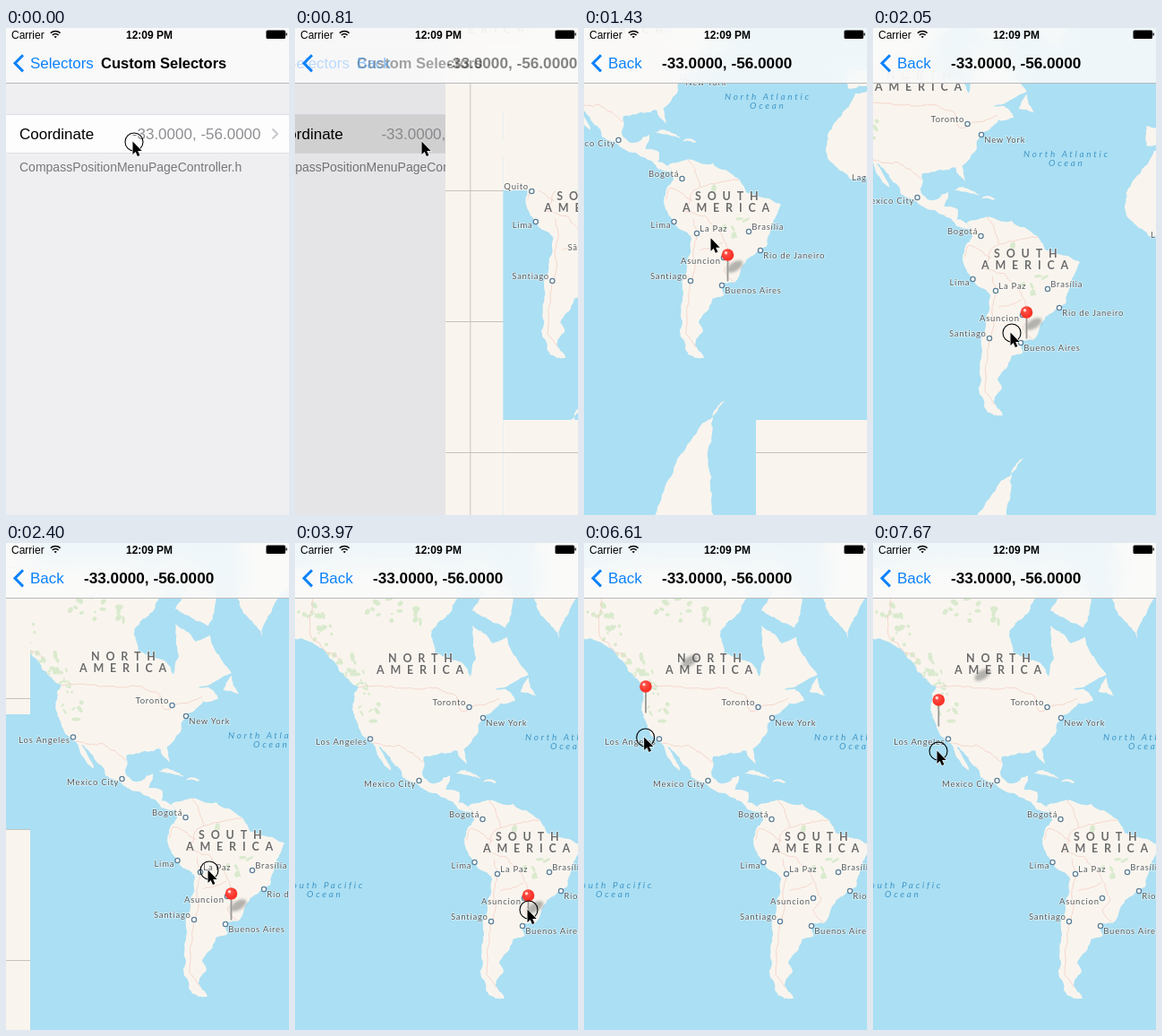
Write an HTML page that moves like this. It is 316 px wide and 543 px high and loops after 8 s.

```html
<!DOCTYPE html>
<html lang="en">
<head>
<meta charset="utf-8">
<title>Coordinate picker</title>
<style>
  html, body { margin: 0; width: 316px; height: 543px; overflow: hidden; background: #efeff2; }
  svg, #bar { position: absolute; left: 0; top: 0; display: block; }
  #bar { width: 316px; height: 61px; background: rgba(251,251,251,.85); backdrop-filter: blur(14px); border-bottom: 1px solid #b9b9bb; }
  text { font: 17px "Liberation Sans", Arial, sans-serif; white-space: pre; }
  text.title { font-weight: bold; }
  text.status { font-size: 12px; }
  #labels text { font: 9.5px Lato, sans-serif; letter-spacing: .75px; fill: #55585a; paint-order: stroke; stroke: #fff9; stroke-width: 1.5px; }
  #labels text.land { font: bold 12.5px Lato, sans-serif; letter-spacing: 6.8px; fill: #6d6b69; }
  #labels text.sea { font: italic 10px Lato, sans-serif; letter-spacing: 2.7px; fill: #3f97c8; stroke: none; }
  #labels circle { fill: #fff; stroke: #5c7f98; stroke-width: 1.3; }
</style>
</head>
<body>
<svg width="316" height="543">
  <defs>
    <pattern id="grid" x="127" y="321" width="146" height="146" patternUnits="userSpaceOnUse">
      <path fill="#f9f5ee" d="M0 0H146V146H0z"/>
      <path stroke="#c6c3bd" fill="none" d="M0 .5H146M.5 0V146"/>
    </pattern>
    <filter id="soft" x="-50%" y="-50%" width="200%" height="200%"><feGaussianBlur stdDeviation="1.8"/></filter>
    <radialGradient id="red" cx=".4" cy=".35"><stop offset="0" stop-color="#ff5a4e"/><stop offset="1" stop-color="#fb3228"/></radialGradient>
    <clipPath id="frame"><path d="M0 0H316V543H0z"/></clipPath>
    <clipPath id="ashore"><use href="#land"/></clipPath>
  </defs>
  <g id="list">
    <path fill="#efeff2" d="M0 0H316V543H0z"/>
    <path id="row" d="M0 96H316V140H0z"/>
    <path stroke="#dfdee2" d="M0 96.5H316M0 139.5H316"/>
    <text x="15" y="124">Coordinate</text>
    <text x="284.5" y="124" text-anchor="end" fill="#8e8e93">-33.0000, -56.0000</text>
    <path d="M297.5 112.5l5.5 5.5-5.5 5.5" fill="none" stroke="#c7c7cc" stroke-width="2"/>
    <text x="15" y="160" fill="#77777c" style="font-size:14px">CompassPositionMenuPageController.h</text>
    <path id="dim" d="M0 0H316V543H0z"/>
  </g>
  <g id="screen" clip-path="url(#frame)">
    <g id="map">
      <path fill="#abdff3" d="M-92-63H420V705H-92z"/>
      <path id="land" fill="#f9f5ee"/>
      <g id="parks" fill="#cfe6c3" opacity=".75" clip-path="url(#ashore)"></g>
      <path id="borders" fill="none" stroke="#f5cdc4" stroke-width=".8"/>
      <g id="tiles" fill="url(#grid)"></g>
      <g id="labels"></g>
      <ellipse id="shadow" rx="10" ry="5" fill="#444" opacity=".38" filter="url(#soft)"/>
      <g id="pin">
        <path d="M0 5V29.5" stroke="#999a98" stroke-width="1.8"/>
        <circle r="6.8" fill="url(#red)"/>
        <circle cx="-2" cy="-2.2" r="1.7" fill="#ffd9d5"/>
      </g>
    </g>
  </g>
  <g id="cursor">
    <circle id="touch" r="10" fill="none" stroke="#000" stroke-width="1.1"/>
    <path d="M-1.5-.5v14.5l3.2-3 2.2 5 2.5-1.1-2.2-4.9h4.5z" stroke="#fff" stroke-width="1.1" paint-order="stroke"/>
  </g>
</svg>
<div id="bar"></div>
<svg width="316" height="62">
  <text class="status" x="6" y="11.5">Carrier</text>
  <g fill="none" stroke="#000" stroke-width="1.6">
    <path d="M49.8 5.6a8 8 0 0 1 10.8 0M51.8 8a5 5 0 0 1 6.8 0"/>
    <path d="M55.2 11.3l-1.6-1.5a2.3 2.3 0 0 1 3.2 0z" fill="#000" stroke="none"/>
  </g>
  <text class="status title" x="134" y="11.5">12:09 PM</text>
  <path d="M292 2.5h18.5a1.5 1.5 0 0 1 1.5 1.5v6.5a1.5 1.5 0 0 1-1.5 1.5H292a1.5 1.5 0 0 1-1.5-1.5V4a1.5 1.5 0 0 1 1.5-1.5zM312.5 5.5h1.3v3h-1.3z"/>
  <path d="M19 30.2L10 39.3L19 48.4" fill="none" stroke="#0b82fb" stroke-width="3"/>
  <text id="parent" y="45" fill="#0b82fb">Selectors</text>
  <text id="oldTitle" class="title" y="45" style="font-size:16.5px">Custom Selectors</text>
  <text id="back" y="45" fill="#0b82fb">Back</text>
  <text id="newTitle" class="title" y="45" style="font-size:17.2px">-33.0000, -56.0000</text>
</svg>
<script>
const LOOP = 8000;
const $ = id => document.getElementById(id);
const add = (parent, tag, attrs, text = '') => {
  const el = document.createElementNS('http://www.w3.org/2000/svg', tag);
  for (const k in attrs) el.setAttribute(k, attrs[k]);
  el.textContent = text;
  return $(parent).appendChild(el);
};
let seed = 7;
const random = () => (seed = seed * 16807 % 2147483647) / 2147483647;

// Mercator world, 1024 px wide
const project = (lon, lat) => [
  420 + lon * 1024 / 360,
  321 - 512 / Math.PI * Math.log(Math.tan(Math.PI / 4 + lat * Math.PI / 360))
];
// Midpoint displacement turns a coarse outline into a ragged coast
const roughen = (a, b, depth) => {
  const dx = b[0] - a[0], dy = b[1] - a[1], length = Math.hypot(dx, dy);
  if (!depth || length < 2) return [b];
  const shift = (random() - .5) * Math.min(.24, 5 / length);
  const mid = [a[0] + dx / 2 - dy * shift, a[1] + dy / 2 + dx * shift];
  return [...roughen(a, mid, depth - 1), ...roughen(mid, b, depth - 1)];
};
const trace = (coords, close = '') => {
  const corners = coords.trim().split(/,\s*/).map(pair => project(...pair.split(' ').map(Number)));
  if (close) corners.push(corners[0]);
  const points = corners.flatMap((p, i) => i ? roughen(corners[i - 1], p, 4) : [p]);
  return 'M' + points.map(p => p.map(v => v.toFixed(1))).join('L') + close;
};

// Corner points as longitude and latitude
const outlines = {
  northAmerica: `-168 66, -162 59, -163 55, -152 60, -145 60, -137 58, -128 51.5, -122.8 49, -124.4 47.5, -124.2 40.4,
    -120.6 34.6, -117 32.5, -115 28, -110 23, -114.7 31.5, -109.3 26, -105.4 20.5, -97 16, -92 14.5, -83.6 8.6, -78 7.2,
    -79.6 9.5, -83.5 11, -83.3 15, -88.5 16, -87 21.4, -91 18.7, -95 18.6, -97.8 22.4, -97 28, -90 29.3, -84 30, -80.4 25.2,
    -81.4 30.5, -76 35.5, -74 40.5, -70.5 42, -67 44.7, -61 45.5, -65 48.5, -69 48.4, -56 52, -64.5 60.3, -70 59, -78 62.4,
    -76.6 56, -79 51.6, -82.3 55, -92.8 57, -94 61.5, -87 64.5, -82 68, -95 72, -157 71`,
  southAmerica: `-79.6 9.5, -72 12, -62 10.6, -51.5 4.2, -48.5 -1, -35.2 -5.5, -39 -14, -40.8 -21.5, -48.5 -26, -53.5 -34,
    -58 -34.2, -57.5 -38, -62 -39, -67.5 -46, -65.8 -48, -69 -51.5, -65.5 -54.8, -71.5 -54, -75 -48, -73.5 -37, -70.2 -18.4,
    -76.2 -14, -81.3 -4.5, -80 1, -77.4 4, -78 7.2`,
  cuba: '-84.9 21.9, -81 23.2, -74.2 20.2, -78 20.8',
  hispaniola: '-74.4 18.4, -72 19.9, -68.4 18.6',
  newfoundland: '-59.3 47.7, -56 51.5, -53 46.7',
  baffin: '-65 62, -78 65, -73 68, -88 71, -75 72, -62 67',
  greenland: '-54 75, -51 69.5, -53.8 67, -44 60, -40 65, -20 75',
  africa: '0 36, -6 35.5, -10 30, -17 21, -17.4 14.7, -8 4.4, 0 5',
  iberia: '0 43, -9 43, -9 37, 0 38',
  antarctica: '-57 -63.3, -62 -65.5, -64 -71, -61 -78, -85 -78, -75 -71.5, -66 -67'
};
$('land').setAttribute('d', Object.values(outlines).map(c => trace(c, 'z')).join(''));
$('borders').setAttribute('d', [
  '-122.8 49, -109 49, -95 49, -84 46.5, -82.5 42.5, -71 45, -67.5 46',
  '-117 32.5, -106.5 31.8, -97.2 26',
  '-141 70, -141 60, -130 55.5',
  '-51.6 4.2, -60 3, -69.5 0, -73.5 -7.5, -65 -10, -58 -18, -54.5 -26, -57.6 -30, -53.5 -33.7',
  '-70 -4, -78.8 1, -80.3 -3.5',
  '-71.5 12, -67 1.2',
  '-69.5 -11, -69 -20, -70 -33, -72.5 -49, -68.4 -52.3',
  '-67 -22.8, -58 -20'
].map(c => trace(c)).join(''));

// Green patches scattered along a line
const scatter = (count, x0, y0, x1, y1) => {
  for (let i = 0; i < count; i++) {
    const p = random(), cx = x0 + (x1 - x0) * p + (random() - .5) * 34, cy = y0 + (y1 - y0) * p + (random() - .5) * 20;
    add('parks', 'ellipse', { cx, cy, rx: 1 + random() * 4, ry: 1 + random() * 2, transform: `rotate(${random() * 180} ${cx} ${cy})` });
  }
};
scatter(50, 15, 70, 95, 195);
scatter(14, 80, 68, 150, 85);
scatter(10, 238, 312, 270, 370);

// Map tiles stay blank until loaded
const tiles = [];
for (let i = -1; i < 3; i++) for (let j = -2; j < 4; j++) {
  const cached = i > 0 && j > 0 && i + j < 4;
  const loaded = cached ? 0 : i >= 0 || !j ? 1160 + random() * 320 : 2450;
  tiles.push({ el: add('tiles', 'rect', { x: 36 + 128 * i, y: 193 + 128 * j, width: 128, height: 128 }), loaded });
}

// Labels: text, x, y, compass side of the dot, first and last time shown
const ALWAYS = LOOP + 500, LATER = 1250;
const fades = [];
for (const [name, x, y, side, from = LATER, to = ALWAYS] of [
  ['Lima', 200.5, 356, 'SW', 0], ['Santiago', 219, 422, 'NW', 0], ['Buenos Aires', 254, 427, 'SE', 0],
  ['Brasília', 284, 367, 'NE', 0], ['Quito', 196, 322, 'NW', 0, 1200], ['São Paulo', 287, 390, 'NW', 0, 1150],
  ['La Paz', 226, 369, 'NE', 1070], ['Asuncion', 256, 396, 'SW'], ['Rio de Janeiro', 297, 388, 'SE'],
  ['Bogotá', 209.5, 308, 'NW'], ['Mexico City', 138.5, 265, 'SW'], ['New York', 210, 195, 'SE'],
  ['Toronto', 194.5, 183, 'NW'], ['Los Angeles', 84, 218.5, 'SW'], ['Lagos', 430, 303, 'SW']
]) {
  const west = side[1] === 'W', dy = side[0] === 'N' ? -1.7 : west ? 6.8 : 8.5;
  const dot = add('labels', 'circle', { cx: x, cy: y, r: 2.6 });
  const label = add('labels', 'text', { x: x + (west ? -3.3 : 3.3), y: y + dy, 'text-anchor': west ? 'end' : 'start' }, name);
  fades.push({ els: [dot, label], from, to });
}
for (const [word, x, y, kind, from = 0] of [
  ['NORTH', 104, 133, 'land'], ['AMERICA', 91, 146, 'land'], ['SOUTH', 224, 331.5, 'land'], ['AMERICA', 210, 344.5, 'land'],
  ['North Atlantic', 257, 219.5, 'sea', LATER], ['Ocean', 285, 229.5, 'sea', LATER],
  ['South Pacific', -11, 384.5, 'sea', 2550], ['Ocean', 13, 394.5, 'sea', 2550]
]) fades.push({ els: [add('labels', 'text', { x, y, class: kind }, word)], from, to: ALWAYS });

// Keys are [time, x, y], eased in between
const panKeys = [[1580, -100, -140], [2050, -89, -76], [2400, -9, -2], [3180, 0, 0]];
const cursorKeys = [[1150, 143, 127], [1580, 143, 276], [2050, 155, 340], [2400, 227, 365], [3180, 257, 407], [3610, 261, 409],
  [5750, 261, 409], [6350, 46, 222], [6700, 73, 216], [7140, 74, 234], [7665, 74, 234], [7670, 73, 232]];
const clamp = v => Math.max(0, Math.min(1, v));
const easeOut = v => 1 - (1 - clamp(v)) ** 3;
const smooth = v => v * v * (3 - 2 * v);
const follow = (keys, t) => {
  const next = keys.findIndex(k => k[0] > t);
  const b = keys.at(next), a = next > 0 ? keys[next - 1] : b;
  const p = a === b ? 0 : smooth((t - a[0]) / (b[0] - a[0]));
  return next < 0 ? b.slice(1) : [1, 2].map(i => a[i] + (b[i] - a[i]) * p);
};
const move = (id, x, y, more = '') => $(id).setAttribute('transform', `translate(${x} ${y})${more}`);
const slideText = (id, x, opacity) => { $(id).setAttribute('x', x); $(id).setAttribute('opacity', opacity); };
const show = (el, visible) => { el.style.display = visible ? '' : 'none'; };

function draw(t) {
  // Push transition, critically damped
  const s = Math.max(0, t - 700) * .0142;
  const push = t < 720 ? 0 : t > 1400 ? 1 : 1 - (1 + s) * Math.exp(-s);
  show($('screen'), push > 0);
  move('list', -95 * push, 0);
  move('screen', 316 * (1 - push), 0);
  $('row').setAttribute('fill', push ? '#d9d9d9' : '#fdfdfd');
  $('dim').setAttribute('opacity', .09 * push);
  slideText('parent', 27 - 79 * push, clamp(1 - 1.6 * push));
  slideText('oldTitle', 106 - 79 * push, clamp(1 - 1.4 * push));
  slideText('back', 106 - 79 * push, push);
  slideText('newTitle', 87 + 156 * (1 - push), push);

  move('map', ...follow(panKeys, t));
  for (const { el, loaded } of tiles) show(el, t < loaded);
  for (const { els, from, to } of fades) {
    const opacity = Math.min(from ? clamp((t - from + 80) / 160) : 1, clamp((to - t) / 160));
    for (const el of els) el.setAttribute('opacity', opacity);
  }

  const [x, y] = follow(cursorKeys, t);
  move('cursor', x, y);
  show($('touch'), t < 90 || (t >= 1610 && t < 2440) || (t >= 3970 && t < 4860) || t >= 5220);

  // The pin settles, then lifts on a long press and trails the drag briefly
  const lift = t < 2000 ? 10 * (1 - easeOut((t - 1070) / 200)) : 41 * easeOut((t - 5360) / 290);
  const lag = 1 - easeOut((t - 5830) / 200);
  const [headX, headY] = t < 5830 ? [260.5, 393 - lift] : [x + .3 + 7.7 * lag, y - 57 + 9 * lag];
  move('pin', headX, headY);
  move('shadow', headX + 8 + lift, headY + 13 - lift, ' rotate(-32)');
}

const tick = () => { draw(performance.now() % LOOP); requestAnimationFrame(tick); };
tick();
</script>
</body>
</html>
```
